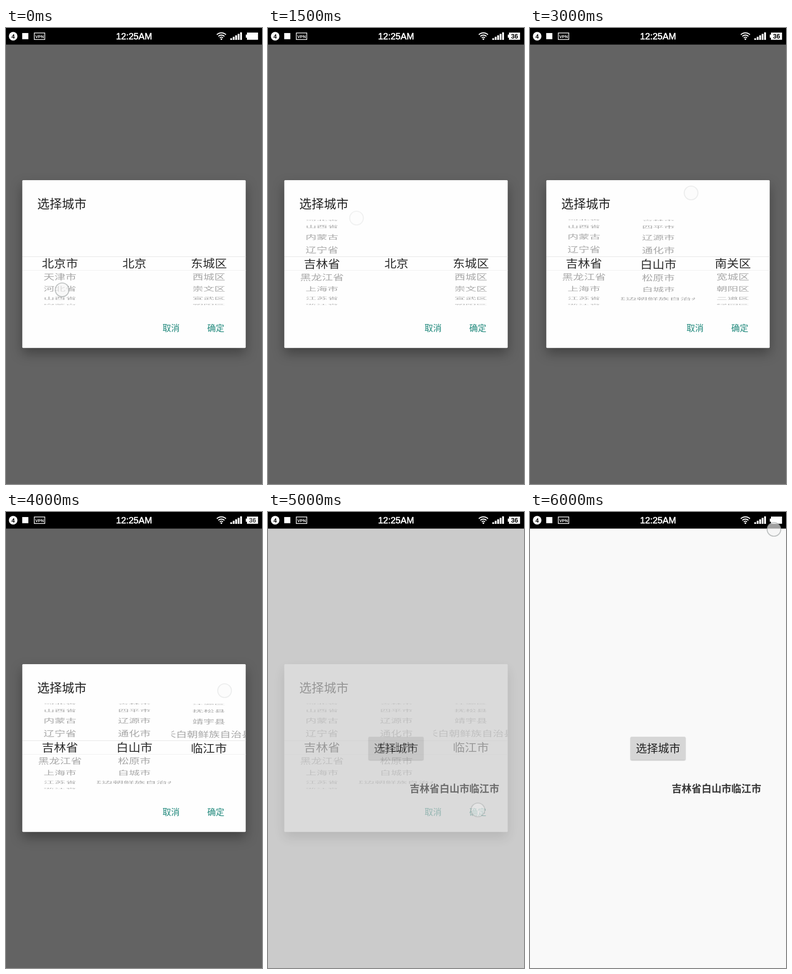
These frames come from a looping animation (561x998 px, 6100 ms). An HTML page:

```html
<!DOCTYPE html>
<html lang="zh-CN">
<head>
<meta charset="utf-8">
<title>选择城市</title>
<style>
  html, body { margin: 0; width: 100%; height: 100%; overflow: hidden; background: #f9f9f9; }
  svg { display: block; width: 561px; height: 998px; }
  text { font-family: "Noto Sans CJK SC", "Noto Sans CJK", "Noto Sans", sans-serif; }
  .latin { font-family: "Liberation Sans", Arial, sans-serif; }
  .bold { font-weight: 700; }
  .mid { text-anchor: middle; }
  .outer { fill: #a8a8a8; }
  .inner { fill: #2a2a2a; }
  .wheel text { font-size: 24px; text-anchor: middle; }
  .card { fill: #fefefe; filter: drop-shadow(0 12px 13px rgba(0, 0, 0, .33)); }
  .raised { fill: #d6d6d6; filter: drop-shadow(0 1px 1px rgba(0, 0, 0, .3)); }
</style>
</head>
<body>
<svg viewBox="0 0 561 998">
  <defs id="defs"></defs>

  <g id="page">
    <rect width="561" height="998" fill="#f9f9f9"/>
    <rect class="raised" x="220.5" y="492" width="120" height="50.5" rx="2"/>
    <text x="232" y="526.2" font-size="24.3" fill="#222">选择城市</text>
    <text class="bold" x="310.5" y="612.8" font-size="21.8" fill="#383838">吉林省白山市临江市</text>
  </g>

  <rect id="dim" width="561" height="998"/>

  <g id="dialog">
    <rect class="card" x="35.7" y="333" width="489.6" height="367.3" rx="2"/>
    <text x="68.5" y="394.6" font-size="27" fill="#212121">选择城市</text>
    <path d="M36 500.5h489.5" stroke="#e2e2e2"/>
    <path d="M36 530.5h489.5" stroke="#eeeeee"/>
    <g id="wheels" class="wheel"></g>
    <g font-size="18.8" fill="#1d877a">
      <text x="343" y="663.6">取消</text>
      <text x="441" y="663.6">确定</text>
    </g>
  </g>

  <g id="status" fill="#fff">
    <rect width="561" height="36.3" fill="#000"/>
    <circle cx="15.7" cy="18" r="9.4"/>
    <text class="latin bold mid" x="15.7" y="22.7" font-size="13" fill="#000">4</text>
    <rect x="35.5" y="11" width="13.5" height="13.5"/>
    <rect x="62" y="10.8" width="23" height="14.4" fill="none" stroke="#fff" stroke-width="1.5"/>
    <text class="latin bold mid" x="73.6" y="21.5" font-size="9.2">VPN</text>
    <text class="latin mid" x="280.7" y="25" font-size="19.7" stroke="#fff" stroke-width=".7">12:25AM</text>
    <g fill="none" stroke="#fff" stroke-width="2.3">
      <path d="M462 14.6a14.5 14.5 0 0 1 20 0"/>
      <path d="M465.3 18.2a9.6 9.6 0 0 1 13.4 0"/>
      <path d="M468.5 21.6a5 5 0 0 1 7 0"/>
    </g>
    <circle cx="472" cy="24.4" r="1.8"/>
    <path d="M525.5 14.5h2.5v-4.5h24.3v15.8h-24.3v-4.5h-2.5z"/>
    <text id="percent" class="latin bold mid" x="540.2" y="23" font-size="14" fill="#000">36</text>
  </g>

  <circle id="touch" r="15" fill="#f4f5f5" fill-opacity=".65" stroke="#929898" stroke-opacity=".55" stroke-width="2.2"/>
</svg>

<script>
const NS = 'http://www.w3.org/2000/svg';
const LOOP = 6100, STEP = 100;
const $ = id => document.getElementById(id);
const ramp = (t, from, length) => Math.min(1, Math.max(0, (t - from) / length));
const mix = (a, b, f) => a + (b - a) * f;
const words = s => s.split(' ');

const provinces = words('北京市 天津市 河北省 山西省 内蒙古 辽宁省 吉林省 黑龙江省 上海市 江苏省 浙江省 安徽省 福建省');
const cities = {
  beijing: ['北京'],
  jilin: words('长春市 吉林市 四平市 辽源市 通化市 白山市 松原市 白城市 延边朝鲜族自治州')
};
const districts = {
  beijing: words('东城区 西城区 崇文区 宣武区 朝阳区 丰台区'),
  changchun: words('南关区 宽城区 朝阳区 二道区 绿园区 双阳区'),
  baishan: words('八道江区 江源区 抚松县 靖宇县 长白朝鲜族自治县 临江市')
};

// Wheel geometry: eleven rows around half a cylinder
const ROW = 30.5, RADIUS = 10 * ROW / Math.PI, MID = 515.5, TEXT = 21.8;
const LEFT = 36, COL = 163.17;
const BANDS = [
  { y: 400, h: 100.5, inner: false },
  { y: 500.5, h: 30, inner: true },
  { y: 530.5, h: 90, inner: false }
];

function make(parent, tag, attrs) {
  const el = document.createElementNS(NS, tag);
  for (const k in attrs) el.setAttribute(k, attrs[k]);
  return parent.appendChild(el);
}

function makeWheel(col) {
  const x = LEFT + col * COL;
  const cx = x + COL / 2 + 0.6;
  const bands = BANDS.map(({ y, h, inner }, i) => {
    const id = `clip${col}${i}`;
    make(make($('defs'), 'clipPath', { id }), 'rect', { x, y, width: COL, height: h });
    const g = make($('wheels'), 'g', { 'clip-path': `url(#${id})`, class: inner ? 'inner' : 'outer' });
    return { inner, rows: Array.from({ length: 12 }, () => make(g, 'text', {})) };
  });

  return (list, pos) => {
    const first = Math.floor(pos) - 5;
    for (const { inner, rows } of bands) {
      rows.forEach((el, j) => {
        const angle = (first + j - pos) * ROW / RADIUS;
        const c = Math.cos(angle);
        const label = c > 0.02 ? list[first + j] || '' : '';
        if (el.textContent !== label) el.textContent = label;
        if (!label) return;
        const top = MID + RADIUS * Math.sin(angle) - c * TEXT / 2;
        const sy = c * c * (inner ? 1 : 0.8);
        const base = top + sy * (inner ? TEXT - 2.4 : TEXT);
        el.setAttribute('transform', `matrix(${inner ? 1.1 : 1} 0 0 ${sy} ${cx} ${base})`);
      });
    }
  };
}

// Each gesture moves evenly from one point to another while the finger is down
const gesture = (down, up, from, to = from) => ({ down, up, from, to });
const swipes = [
  gesture(0, 1200, [123, 573], [194, 416]),
  gesture(2100, 2750, [300, 491], [353, 361]),
  gesture(3300, 3750, [440, 525], [479, 391])
];
const gestures = [
  ...swipes,
  gesture(4700, 4900, [460, 652]),
  gesture(5600, LOOP, [537, 38], [534, 38])
];

// The wheel follows the finger, then eases onto its final row
function spin(t, { down, up, from, to }, target) {
  const dragged = (from[1] - to[1]) / ROW;
  const settle = 1 - (1 - ramp(t, up, 450)) ** 3;
  return mix(dragged * ramp(t, down, up - down), target, settle);
}

function drawTouch(t) {
  const { down, up, from, to } = gestures.findLast(g => t >= g.down);
  const f = ramp(t, down, up - down);
  const glow = Math.exp(-Math.max(0, t - up) / 200);
  $('touch').setAttribute('transform', `translate(${mix(from[0], to[0], f)} ${mix(from[1], to[1], f)})`);
  $('touch').style.opacity = glow > 0.1 ? glow : 0;
}

const pulse = (t, on, off) => ramp(t, on, 200) - ramp(t, off, 200);

const wheels = [0, 1, 2].map(makeWheel);
for (let i = 0; i < 5; i++) {
  const height = 3.5 + 3.25 * i;
  make($('status'), 'rect', { x: 491.5 + 5.4 * i, y: 26 - height, width: 4, height });
}

function draw(t) {
  const inJilin = t >= 1700, inBaishan = t >= 3200;
  const lists = [
    provinces,
    inJilin ? cities.jilin : cities.beijing,
    inBaishan ? districts.baishan : inJilin ? districts.changchun : districts.beijing
  ];
  const targets = [6, 5, 5];
  wheels.forEach((turn, i) => turn(lists[i], spin(t, swipes[i], targets[i])));

  const shown = 1 - ramp(t, 4820, 260);
  $('dialog').style.opacity = shown;
  $('dim').style.opacity = 0.6 * shown;
  $('percent').style.opacity = pulse(t, 900, 3300) + pulse(t, 3850, 5600);
  drawTouch(t);
}

const start = performance.now();
function tick() {
  const t = (performance.now() - start) % LOOP;
  draw(Math.floor(t / STEP) * STEP);
  requestAnimationFrame(tick);
}
tick();
</script>
</body>
</html>
```
